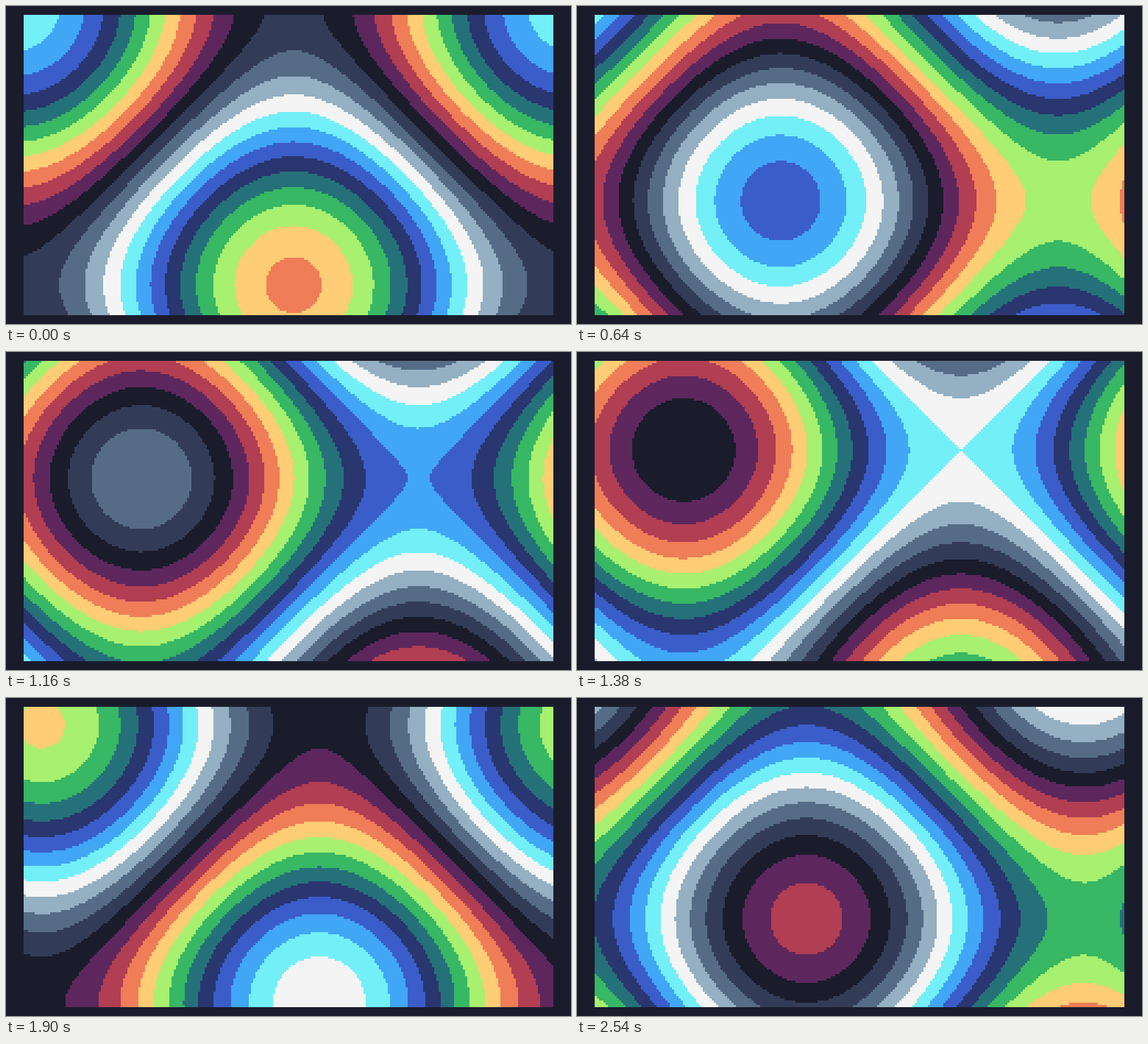
Animation of 768 by 432 pixels, one loop 2.56 s. Source, as an HTML page with a canvas:

```html
<!DOCTYPE html>
<html>
<head>
<meta charset="utf-8">
<title>Plasma</title>
<style>
  html, body { margin: 0; width: 100%; height: 100%; overflow: hidden; background: #1a1c2c; }
  canvas { position: absolute; left: 24px; top: 12px; width: 720px; height: 408px; image-rendering: pixelated; }
</style>
</head>
<body>
<canvas id="screen" width="240" height="136"></canvas>
<script>
const LOOP = 2560, STEP = 20, FIRST_TICK = 318;
const palette = [
  0x1a1c2c, 0x5d275d, 0xb13e53, 0xef7d57, 0xffcd75, 0xa7f070, 0x38b764, 0x257179,
  0x29366f, 0x3b5dc9, 0x41a6f6, 0x73eff7, 0xf4f4f4, 0x94b0c2, 0x566c86, 0x333c57
];
const canvas = document.getElementById('screen');
const { width, height } = canvas;
const ctx = canvas.getContext('2d');
const image = ctx.createImageData(width, height);

function drawPlasma(tick) {
  const wave = Array.from({ length: width }, (_, i) => Math.sin((i + tick) / 40));
  let p = 0;
  for (let y = 0; y < height; y++) {
    for (let x = 0; x < width; x++) {
      const rgb = palette[Math.floor(6 * (wave[x] + wave[y] + tick / 40)) & 15];
      image.data[p++] = rgb >> 16;
      image.data[p++] = rgb >> 8 & 255;
      image.data[p++] = rgb & 255;
      image.data[p++] = 255;
    }
  }
  ctx.putImageData(image, 0, 0);
}

// The plasma ticks 60 times a second, shown at 50 pictures a second.
function frame() {
  const step = Math.floor(performance.now() % LOOP / STEP);
  drawPlasma(FIRST_TICK + Math.floor(step * 6 / 5));
  requestAnimationFrame(frame);
}
frame();
</script>
</body>
</html>
```
